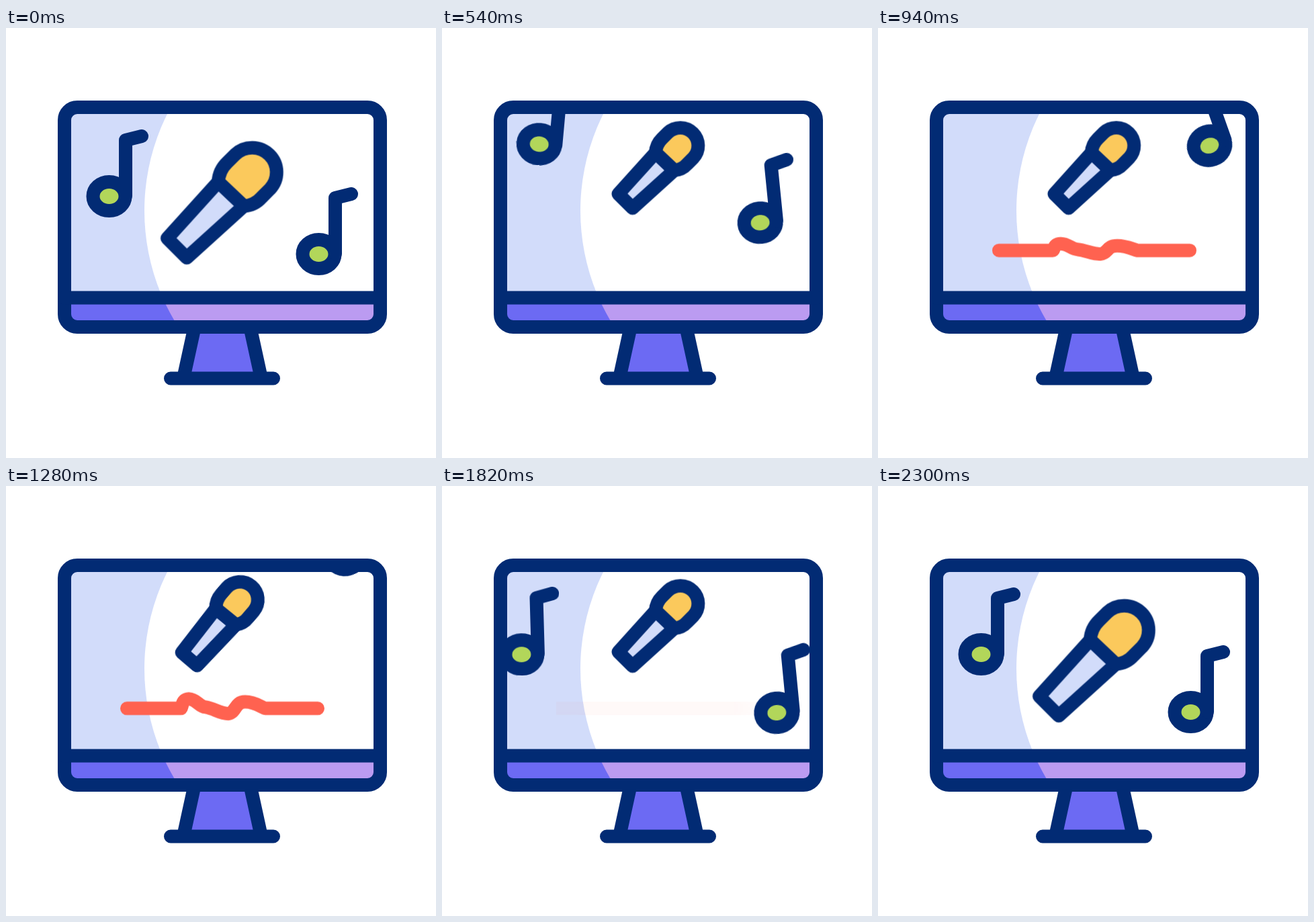
Animation, 640 px wide and 640 px high, one loop 2400 ms. Source, as an HTML page:

```html
<!DOCTYPE html>
<html lang="en">
<head>
<meta charset="utf-8">
<title>Karaoke screen</title>
<style>
  html, body { margin: 0; width: 100%; height: 100%; overflow: hidden; background: #fff; }
  svg { display: block; width: 100vw; height: 100vh; }

  .ink { stroke: #022b74; stroke-width: 20; stroke-linecap: round; stroke-linejoin: round; fill: none; }
  .pale { fill: #d2dcfa; }
  .blue { fill: #6c6af3; }
  .lilac { fill: #bb9bf1; }
  .yellow { fill: #fbc95c; }
  .green { fill: #b2d65a; }
  .wave { fill: none; stroke: #ff6250; stroke-width: 20; stroke-linecap: round; stroke-linejoin: round; }
  .mic path, .wave { vector-effect: non-scaling-stroke; }

  .mic, .tilt, .left, .right, .fade, .wave {
    transform-origin: 0 0;
    animation: 2400ms cubic-bezier(.333, 0, .667, 1) infinite;
  }
  .mic { animation-name: mic; }
  .tilt { animation-name: tilt; }
  .left { animation-name: left; }
  .right { animation-name: right; }
  .fade { animation-name: fade; }
  .wave { animation-name: wave; }

  @keyframes mic {
    0%, 3.75% { transform: translate(254.5px, 327.5px) scale(1); }
    22.5%, 77.083% { transform: translate(273px, 257.5px) scale(.73); }
    95.833%, 100% { transform: translate(254.5px, 327.5px) scale(1); }
  }
  @keyframes tilt {
    0%, 22.5% { transform: rotate(0deg); }
    30.833% { transform: rotate(10deg); }
    47.5% { transform: rotate(-10deg); }
    64.167% { transform: rotate(10deg); }
    72.5%, 100% { transform: rotate(0deg); }
  }
  /* Each note floats out over the top, then swings back in from its side. */
  @keyframes left {
    0%, 4.167% { transform: translate(0px, 0px) rotate(0deg); }
    54.167%, 58.333% { transform: translate(-20px, -250px) rotate(17deg); }
    58.334% { transform: translate(-168px, 0px) rotate(38deg); }
    83.333% { transform: translate(0px, 0px) rotate(-12.4deg); }
    95.833%, 100% { transform: translate(0px, 0px) rotate(0deg); }
  }
  @keyframes right {
    0%, 8.333% { transform: translate(0px, 0px) rotate(0deg); }
    58.333% { transform: translate(26px, -243px) rotate(-29deg); }
    58.334% { transform: translate(140px, 0px) rotate(-68deg); }
    83.333% { transform: translate(0px, 0px) rotate(11.5deg); }
    95.833%, 100% { transform: translate(0px, 0px) rotate(0deg); }
  }
  @keyframes fade {
    0%, 22.5% { opacity: 0; }
    35.833%, 64.167% { opacity: 1; }
    77.5%, 100% { opacity: 0; }
  }
  @keyframes wave {
    0%, 30.833% { transform: scaleY(.005); }
    47.5% { transform: scaleY(1.36); }
    64.167%, 100% { transform: scaleY(.005); }
  }
</style>
</head>
<body>
<svg viewBox="0 0 640 640">
  <defs>
    <clipPath id="screen"><rect x="92" y="123" width="460" height="274"/></clipPath>
    <clipPath id="panel"><rect x="87" y="118" width="470" height="327" rx="19"/></clipPath>
    <g id="note">
      <ellipse class="ink green" cx="-11.5" cy="29.5" rx="24" ry="21.5" style="fill:#b2d65a"/>
      <path class="ink" d="M13 29V-54L37-60"/>
    </g>
  </defs>

  <path class="blue" d="M280 445L266 521H378L364 445Z"/>
  <path class="ink" d="M280.5 446L265 517M363.5 446L379 517M245 521.5H398"/>

  <g clip-path="url(#panel)">
    <rect class="pale" x="87" y="118" width="470" height="284"/>
    <rect class="blue" x="87" y="402" width="470" height="43"/>
    <g clip-path="url(#screen)"><circle cx="528" cy="272" r="322" fill="#fff"/></g>
    <clipPath id="strip"><rect x="87" y="402" width="470" height="43"/></clipPath>
    <circle class="lilac" cx="528" cy="272" r="322" clip-path="url(#strip)"/>
  </g>

  <g class="fade">
    <g transform="translate(0 331)">
      <path class="wave" d="M180 0H260C263 0 260-14 272-14.5C284-14 287-3 297-2C310 0 318 8 331 8C343 6 340-10 356-10C370-10 380-2 386 0H464"/>
    </g>
  </g>

  <g clip-path="url(#screen)">
    <g transform="translate(165 221)"><g class="left"><use href="#note"/></g></g>
    <g transform="translate(477 307)"><g class="right"><use href="#note"/></g></g>
  </g>

  <g class="mic">
    <g class="tilt">
      <path class="ink" style="fill:#d2dcfa" d="M61.5-98.5L99.5-62.5L14.5 14.5L-14.5-14.5Z"/>
      <path class="ink" style="fill:#fbc95c" d="M61.5-98.5Q62.5-115.5 74.5-127.1L86.7-139.3A36.5 36.5 0 0 1 138.3-87.7L126-75.4Q115.5-63.5 99.5-62.5Z"/>
    </g>
  </g>

  <rect class="ink" x="87" y="118" width="470" height="327" rx="19"/>
  <path class="ink" d="M87 401.5H557"/>
</svg>
</body>
</html>
```
